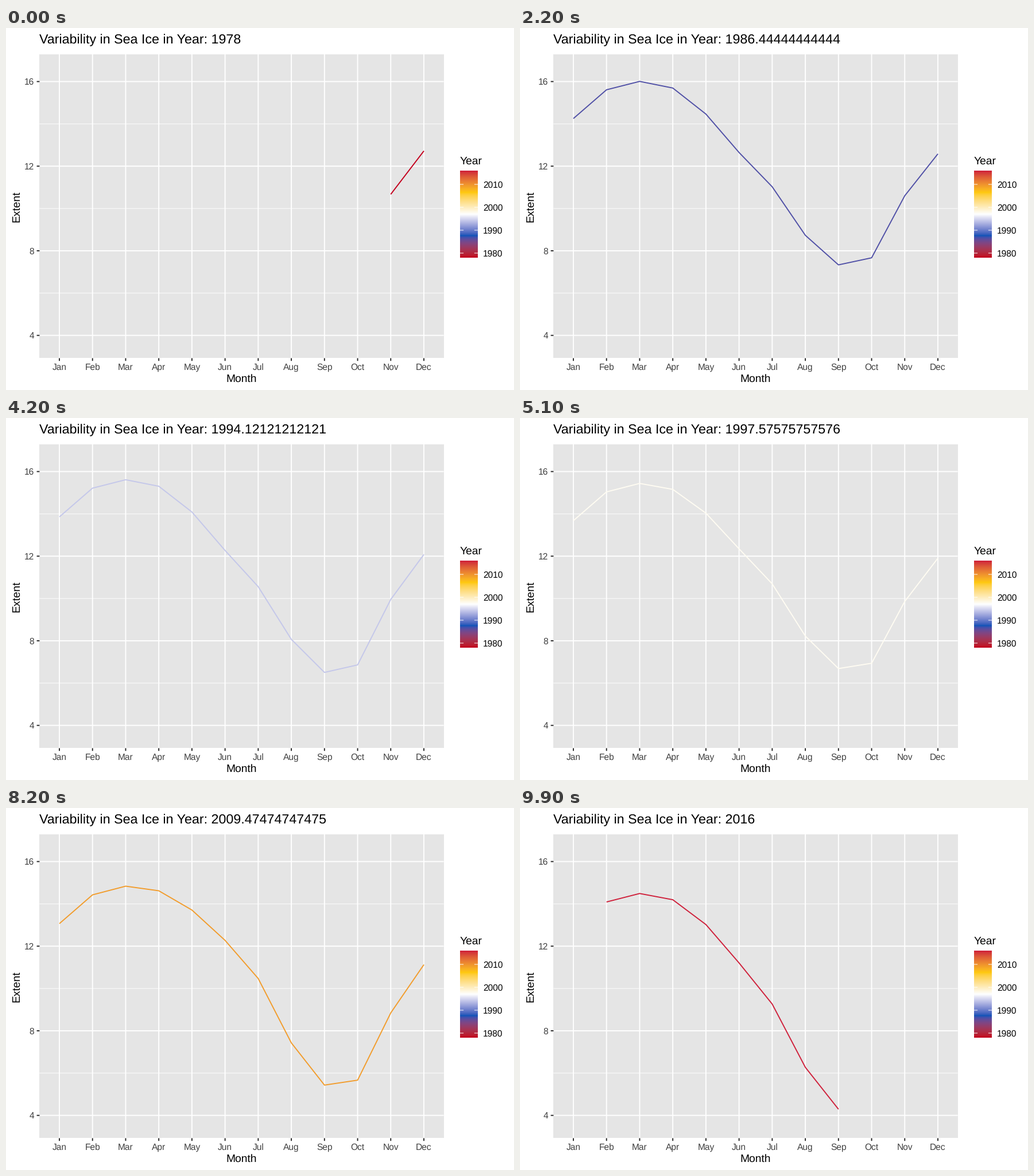
Animation of 885 by 632 pixels, one loop 10000 ms. Source, as a matplotlib script:

```python
import numpy as np
import matplotlib.pyplot as plt
from matplotlib.animation import FuncAnimation

W, H, DPI = 885, 632, 100
FRAMES, FIRST, LAST = 100, 1978, 2016
PX = 72 / DPI
LEFT, RIGHT, TOP, BOTTOM = 58.4, 762.6, 46, 576.4
BAR_L, BAR_R, BAR_B, BAR_T = 791, 822, 401, 249
MONTHS = "Jan Feb Mar Apr May Jun Jul Aug Sep Oct Nov Dec".split()
STOPS = ["#c4001c", "#0a54b8", "#ffffff", "#ffc90e", "#cf1f3a"]
GREY, DARK = "#404040", "#272727"

plt.rcParams.update({"font.family": "Liberation Sans", "text.hinting": "none"})

# Seasonal cycle of a typical early year, and swings (year, size) around its decline.
SEASON = np.array([14.48, 15.84, 16.24, 15.95, 14.80, 13.09,
                   11.44, 8.95, 7.40, 7.77, 10.81, 12.83])
EARLY = [(1982, 0), (1990.6, -.45), (1997.6, .1), (2004, .4), (2009.5, .75), (2016, 0)]
LATE = [(1982, 0), (1987, .4), (1990.6, -.45), (1992, .9), (1995, -.1),
        (1996, 1.5), (1997.6, .64), (2004, .48), (2007.5, -.7), (2009.5, .38),
        (2011.8, -.3), (2012.2, -1.16), (2014, .65), (2016, -.12)]
START = np.array([[10, 11], [10.67, 12.72]])

TO_XYZ = np.array([[.4124564, .3575761, .1804375],
                   [.2126729, .7151522, .0721750],
                   [.0193339, .1191920, .9503041]])
WHITE = TO_XYZ.sum(axis=1)


def to_lab(color):
    c = np.array([int(color[i:i + 2], 16) for i in (1, 3, 5)]) / 255
    lin = np.where(c <= .04045, c / 12.92, ((c + .055) / 1.055) ** 2.4)
    t = TO_XYZ @ lin / WHITE
    x, y, z = np.where(t > .008856, np.cbrt(t), 7.787 * t + 16 / 116)
    return 116 * y - 16, 500 * (x - y), 200 * (y - z)


def to_rgb(lab):
    y = (lab[0] + 16) / 116
    f = np.array([y + lab[1] / 500, y, y - lab[2] / 200])
    t = np.where(f > .2069, f ** 3, (f - 16 / 116) / 7.787)
    lin = np.clip(np.linalg.solve(TO_XYZ, t * WHITE), 0, 1)
    return np.where(lin <= .0031308, lin * 12.92,
                    1.055 * np.maximum(lin, 1e-9) ** (1 / 2.4) - .055)


LABS = np.array([to_lab(c) for c in STOPS])


def year_color(year):
    t = (year - FIRST) / (LAST - FIRST) * (len(STOPS) - 1)
    return to_rgb([np.interp(t, range(len(STOPS)), ch) for ch in LABS.T])


def px(month):
    return 93 + 57.727 * np.asarray(month)


def py(extent):
    return 93.5 - 36.93 * (np.asarray(extent) - 16)


def bump(center, width):
    return np.exp(-((np.arange(12) - center) / width) ** 2)


def swing(points, year):
    return np.interp(year, *zip(*points))


def extents(year):
    loss = 1.75 + 1.3 * bump(8.5, 2.3)
    return (SEASON - loss * (year - 1982) / (LAST - 1982)
            + swing(EARLY, year) * bump(5.5, 1.7)
            + swing(LATE, year) * bump(8.2, 1.8))


def curve(year):
    if year < FIRST + 1:
        end = np.array([[0, 1], extents(FIRST + 1)[:2]])
        return START + (end - START) * (year - FIRST)
    # The closing year has records from February to September only.
    months = np.arange(1, 9) if year >= LAST else np.arange(12)
    return months, extents(year)[months]


fig = plt.figure(figsize=(W / DPI, H / DPI), dpi=DPI, facecolor="white")
ax = fig.add_axes([0, 0, 1, 1])


def rule(xs, ys, width, color="white", z=1):
    return ax.plot(xs, ys, color=color, lw=width * PX, zorder=z, snap=False,
                   solid_capstyle="butt", solid_joinstyle="round")[0]


def label(x, y, text, size, color="black", **kw):
    return ax.text(x, y, text, fontsize=size * PX, color=color,
                   va="baseline", **kw)


ax.add_patch(plt.Rectangle((LEFT, TOP), RIGHT - LEFT, BOTTOM - TOP,
                           fc="#e5e5e5", lw=0, zorder=0))
for v in (6, 10, 14):
    rule([LEFT, RIGHT], [py(v)] * 2, .95)
for v in (4, 8, 12, 16):
    y = py(v)
    rule([LEFT, RIGHT], [y, y], 1.9)
    rule([LEFT - 4.8, LEFT], [y, y], 1.9, DARK)
    label(49.3, y + 5.6, str(v), 15.5, GREY, ha="right")
for m, name in enumerate(MONTHS):
    x = px(m)
    rule([x, x], [TOP, BOTTOM], 1.9)
    rule([x, x], [BOTTOM, BOTTOM + 4.8], 1.9, DARK)
    label(x, 596.6, name, 15.5, GREY, ha="center")
label(410.5, 618, "Month", 19.3, ha="center")
label(23.7, 311.3, "Extent", 19.3, ha="center", rotation=90,
      rotation_mode="anchor")

label(791, 238, "Year", 19.3)
ramp = np.array([[year_color(y)] for y in np.linspace(LAST, FIRST, 152)])
ax.imshow(ramp, extent=(BAR_L, BAR_R, BAR_B, BAR_T), aspect="auto",
          interpolation="bilinear", zorder=1)
for year in range(1980, 2011, 10):
    y = BAR_B - (year - FIRST) / (LAST - FIRST) * (BAR_B - BAR_T)
    rule([BAR_L, BAR_L + 6.1], [y, y], .95, z=2)
    rule([BAR_R - 6.1, BAR_R], [y, y], .95, z=2)
    label(831.3, y + 5.6, str(year), 15.5)

title = label(58, 27.3, "", 23.3)
line = rule([], [], 1.9, z=3)
ax.set(xlim=(0, W), ylim=(H, 0))
ax.axis("off")


def draw(i):
    year = FIRST + (LAST - FIRST) * i / (FRAMES - 1)
    title.set_text(f"Variability in Sea Ice in Year: {year:.15g}")
    months, values = curve(year)
    line.set_data(px(months), py(values))
    line.set_color(year_color(year))
    return title, line


anim = FuncAnimation(fig, draw, frames=FRAMES, interval=100, repeat=True,
                     repeat_delay=0, blit=False)
plt.show()
```
